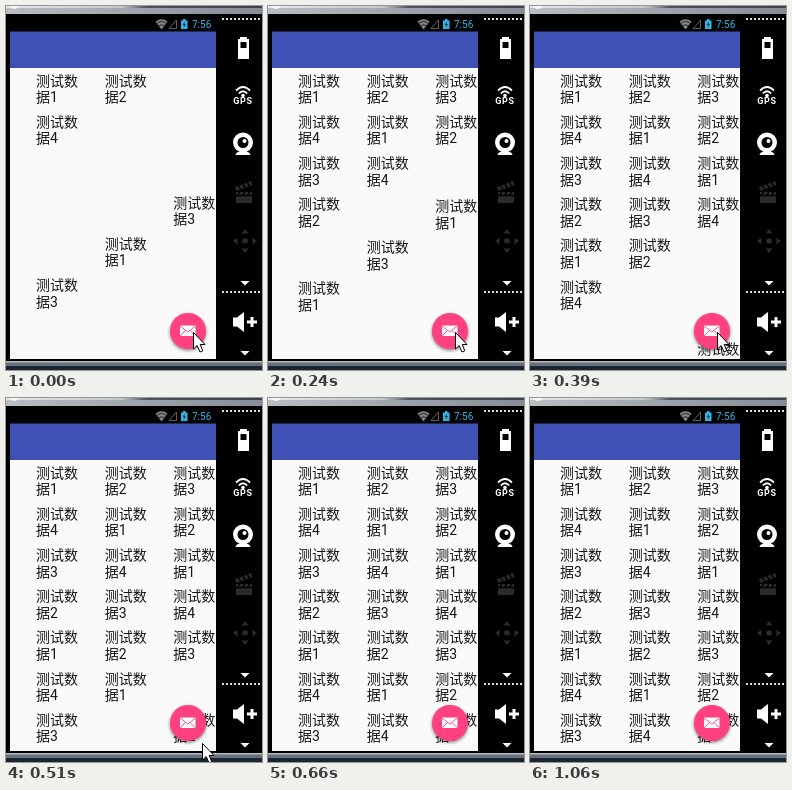
An HTML page that plays this animation: 256 px wide and 364 px high, repeating every 1.13 s.

```html
<!DOCTYPE html>
<html lang="zh">
<head>
<meta charset="utf-8">
<title>Grid entrance</title>
<style>
html, body { margin: 0; width: 100%; height: 100%; overflow: hidden; background: #000; }
svg { display: block; width: 256px; height: 364px; }
.cell { font: 14px Roboto, "Noto Sans CJK SC", "Noto Sans CJK", sans-serif; fill: #161616; }
.wave, .cursor { animation: 1130ms step-end infinite; }
.w2 { animation-name: w2; }
.w3 { animation-name: w3; }
.w4 { animation-name: w4; }
.w5 { animation-name: w5; }
.w6 { animation-name: w6; }
.w7 { animation-name: w7; }
.w8 { animation-name: w8; }
.cursor { animation-name: point; }
/* each diagonal slides up from below, then lands */
@keyframes w2 { 0% { transform: translateY(122px); } 10.61%, to { transform: none; } }
@keyframes w3 { 0% { visibility: hidden; } 10.61% { visibility: visible; transform: translateY(118px); } 21.23%, to { visibility: visible; transform: none; } }
@keyframes w4 { 0% { visibility: hidden; } 21.23% { visibility: visible; transform: translateY(43px); } 34.51%, to { visibility: visible; transform: none; } }
@keyframes w5 { 0% { visibility: hidden; } 34.51%, to { visibility: visible; } }
@keyframes w6 { 0% { visibility: hidden; } 34.51% { visibility: visible; transform: translateY(104px); } 45.13%, to { visibility: visible; transform: none; } }
@keyframes w7 { 0% { visibility: hidden; } 45.13% { visibility: visible; transform: translateY(41px); } 58.4%, to { visibility: visible; transform: none; } }
@keyframes w8 { 0% { visibility: hidden; } 58.4%, to { visibility: visible; } }
@keyframes point {
  0% { transform: translate(187px, 326px); }
  45.13% { transform: translate(196px, 345px); }
  58.4%, to { visibility: hidden; }
}
</style>
</head>
<body>
<svg viewBox="0 0 256 364">
  <defs>
    <linearGradient id="edge">
      <stop offset="0" stop-color="#e4e7ea"/>
      <stop offset=".45" stop-color="#c3c8cd"/>
      <stop offset=".55" stop-color="#4a525b"/>
      <stop offset="1" stop-color="#3b444e"/>
    </linearGradient>
    <linearGradient id="bar">
      <stop offset="0" stop-color="#b9bec3"/>
      <stop offset="1" stop-color="#858c94"/>
    </linearGradient>
    <clipPath id="screen"><path d="M4 62H210V353H4z"/></clipPath>
    <filter id="blur" x="-30%" y="-30%" width="160%" height="160%"><feGaussianBlur stdDeviation="1.8"/></filter>
  </defs>

  <!-- window -->
  <path d="M0 0H256V364H0z"/>
  <path d="M0 0H256V2H0z" fill="url(#edge)"/>
  <path d="M0 2H256V8H0z" fill="url(#bar)"/>
  <circle cx="8" cy="-3" r="6" fill="#f5f5f5"/>
  <path d="M0 355H256V360H0z" fill="#69727c"/>
  <path d="M0 355H256V356.500H0z" fill="#b4bac1"/>
  <path d="M0 360H256V364H0z" fill="#1c2633"/>

  <!-- status bar -->
  <path d="M155.500 23.500L149.500 15.500Q155.500 11 161.500 15.500z" fill="#858585"/>
  <path d="M150.500 17.500Q155.500 13.500 160.500 17.500M152.500 20Q155.500 17.500 158.500 20" fill="none" stroke="#222"/>
  <path d="M163 22.500H170.500V14z" fill="none" stroke="#606060"/>
  <path d="M175 14.500H177V13H179.500V14.500H181.500V23H175z" fill="#33b5e5"/>
  <path d="M178.800 15.500L176.500 19H178L177.500 22L180 18H178.500z" fill="#073b4c"/>
  <text x="186" y="22" font-family="Roboto, sans-serif" font-size="10" fill="#33b5e5">7:56</text>

  <!-- app -->
  <path d="M4 25.500H210V62H4z" fill="#3f51b5"/>
  <path d="M4 62H210V353H4z" fill="#fafafa"/>
  <g id="grid" clip-path="url(#screen)"></g>
  <circle cx="182" cy="326.500" r="18.500" opacity=".4" filter="url(#blur)"/>
  <circle cx="182" cy="325" r="18" fill="#ff4081"/>
  <path d="M174 319.500H189.500V330H174z" fill="#fff"/>
  <path d="M174 320L181.800 326L189.500 320M174 330L179.500 324.500M189.500 330L184 324.500" fill="none" stroke="#ff4081" stroke-width=".9"/>

  <!-- tool column -->
  <g fill="#fff">
    <path d="M216 13H254M216 286H254" stroke="#ddd" stroke-width="2" stroke-dasharray="2 2"/>
    <path d="M234 31H241V33H243V53H232V33H234z"/>
    <path d="M234.500 36H240.500V42H234.500z" fill="#000"/>
    <path d="M230 84.500Q237 77.500 244 84.500M232.800 87.500Q237 83 241.200 87.500" fill="none" stroke="#fff" stroke-width="1.800"/>
    <circle cx="237" cy="89.500" r="1.800"/>
    <text x="237" y="98" text-anchor="middle" font-family="Roboto, sans-serif" font-size="9" font-weight="700" letter-spacing=".6">GPS</text>
    <circle cx="237" cy="136.500" r="10"/>
    <circle cx="237" cy="136.500" r="5.500" fill="#000"/>
    <circle cx="238.500" cy="135" r="2"/>
    <path d="M232 146H242Q244.500 147 244.500 149H229.500Q229.500 147 232 146z"/>
    <g fill="#2b2b2b">
      <path d="M230 186H246V197H230zM229 181L245 175L246.500 179L230.500 185z"/>
      <path d="M232 179L235 184M236.500 177.500L239.500 182M241 176L244 180.500M234 185L232 189M239 185L237 189M244 185L242 189M230 189.500H246" stroke="#000" stroke-width="1.400"/>
      <circle cx="239" cy="235" r="2.800"/>
      <path id="pad" d="M239 223L242.500 227.500H235.500z"/>
      <use href="#pad" transform="rotate(90 239 235)"/>
      <use href="#pad" transform="rotate(180 239 235)"/>
      <use href="#pad" transform="rotate(270 239 235)"/>
    </g>
    <path d="M234.500 275H243.500L239 279.500zM234.500 345H243.500L239 349.500z"/>
    <path d="M227 311.500H231L238 306V326L231 320.500H227z"/>
    <path d="M241 316H251M246 311V321" stroke="#fff" stroke-width="3"/>
  </g>

  <path class="cursor" d="M.5 .5V17L4.200 13.500L7 20L9.800 18.800L7.200 12.500H12z" fill="#fff" stroke="#000"/>
</svg>
<script>
const grid = document.getElementById('grid');

function add(parent, tag, attrs, text = '') {
  const node = document.createElementNS('http://www.w3.org/2000/svg', tag);
  for (const key in attrs) node.setAttribute(key, attrs[key]);
  node.textContent = text;
  return parent.appendChild(node);
}

for (let i = 0; i < 21; i++) {
  const col = i % 3, row = Math.floor(i / 3), wave = col + row;
  const cell = add(grid, 'g', { class: `cell wave w${wave}` });
  const x = 30 + col * 206 / 3, y = 79.8 + row * 41.15;
  add(cell, 'text', { x, y }, '测试数');
  add(cell, 'text', { x, y: y + 16.4 }, `据${i % 4 + 1}`);
}
</script>
</body>
</html>
```
